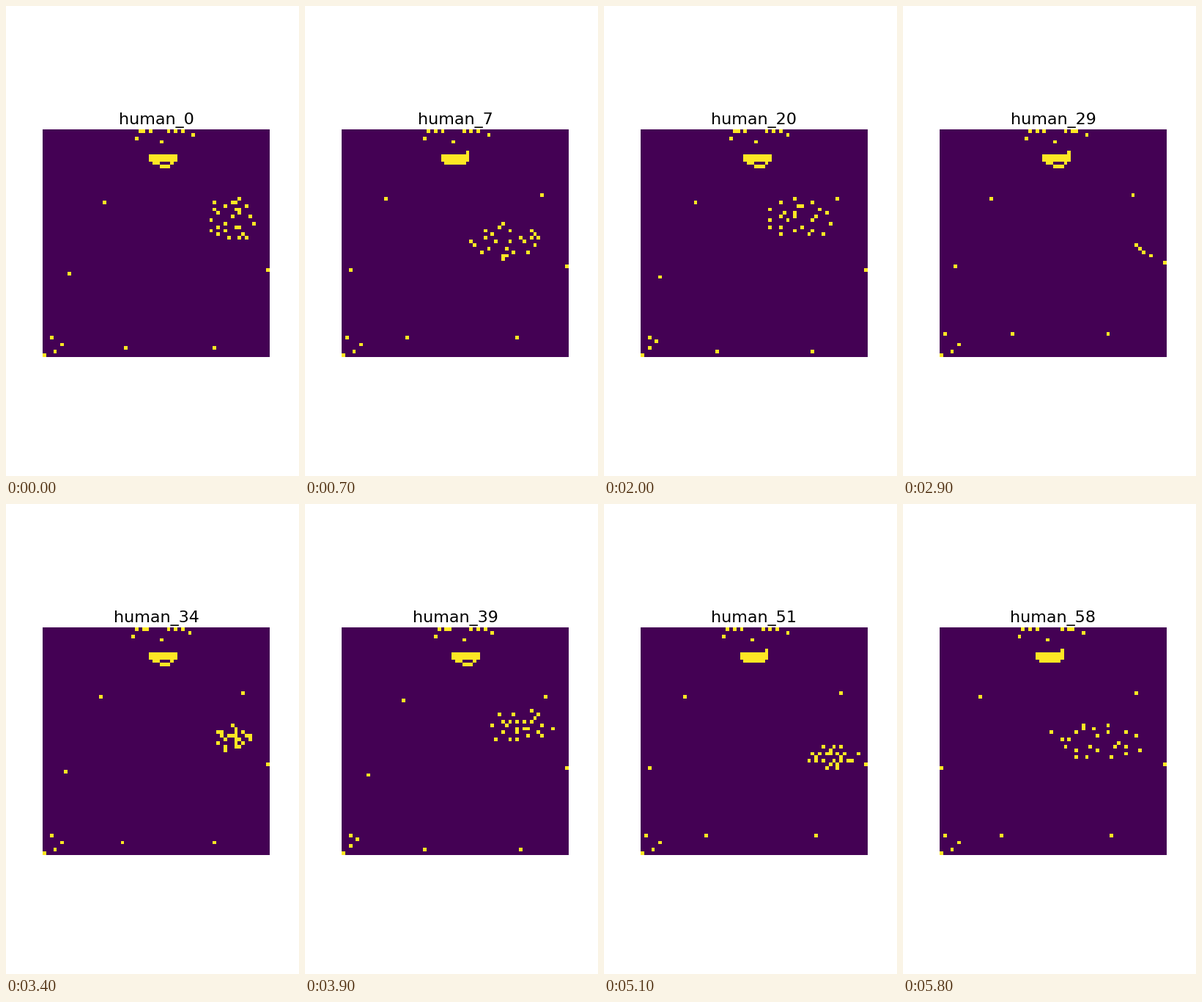
A matplotlib script for the animation above (5.9 s loop, 400 px wide and 640 px high).

```python
import numpy as np
import matplotlib.pyplot as plt
from matplotlib.animation import FuncAnimation

GRID, FRAMES, STEP_MS = 64, 59, 100
KEYS = [0, 7, 20, 29, 39, 45, 58]
JOINTS = 25


def motion(*values):
    return np.interp(np.arange(FRAMES), KEYS, values)


# Body sway, in grid cells
lean = motion(0, -5, -2, -3, 0.4, -4, -6)
dip = motion(0, -3, 1, -4, 1, -3, -3)
turn = motion(0, 1, 0, -1, 2, 1, 0)

# Centre and reach of the signing hands
hand_x = motion(52.5, 46, 44, 56.8, 50, 61.5, 43.5)
hand_y = motion(25, 31, 24.5, 33.8, 27.5, 40, 31.5)
reach_x = motion(7, 11, 9.5, 1.5, 9, 1.5, 13.5)
reach_y = motion(6.5, 5, 6, 2, 4.5, 2, 5.5)

# Evenly spread joints, slightly scattered
index = np.arange(JOINTS)
radius = np.sqrt((index + 0.5) / JOINTS)
angle = index * np.pi * (3 - np.sqrt(5))
scatter = np.random.default_rng(4).normal(0, 0.08, (2, JOINTS))


def body(n):
    a, d, t = lean[n], dip[n], turn[n]
    pts = [
        (33.4 + 0.5 * a, 3),                            # nose
        (25.9 + 0.65 * a, 2), (41.7 + 0.2 * a, 1),      # ears
        (17 + a, 19.9 + 0.3 * d),                       # shoulders
        (55 + t, 18.8 + 0.3 * d),
        (7 + 1.1 * a, 40.3 + 0.5 * d),                  # elbows
        (63, 38.9 + 0.4 * d),
        (23 + a, 61 + d), (48 + t, 61 + d),             # hips
        (1.9 + 0.2 * a, 58.2 + 0.2 * d),                # resting hand
        (4.6 - 0.2 * d, 59.6 - 0.2 * d),
        (2.6 - 0.2 * d, 61.6 - 0.2 * d),
        (0, 63),
    ]
    for i in range(3):  # eyes, the far one moving less
        pts.append((26.9 + 1.6 * i + (0.65 - 0.07 * i) * a, 0))
        pts.append((35.4 + 2 * i + (0.25 + 0.04 * i) * a, 0))
    return pts


def hands(n):
    if reach_x[n] < 3:  # lowered: only the knuckles remain
        i = np.arange(4) - 1.5
        x, y = 1.2 * i, i
    else:
        twist = angle + 0.1 * n
        x = reach_x[n] * (radius * np.cos(twist) + scatter[0])
        y = reach_y[n] * (radius * np.sin(twist) + scatter[1])
    return np.column_stack([hand_x[n] + x, hand_y[n] + y])


def draw_mouth(grid, n):
    left = int(np.rint(33.4 + 0.5 * lean[n])) - 3
    grid[7:9, left:left + 8] = 1
    if lean[n] > -3.5:  # open
        grid[9, [left + 1, left + 2, left + 6]] = 1
        grid[10, left + 3:left + 6] = 1
    else:
        grid[9, left + 1:left + 7] = 1
    if dip[n] < -2:  # raised corner
        grid[6, left + 7] = 1


def grid_at(n):
    grid = np.zeros((GRID, GRID))
    pts = np.vstack([body(n), hands(n)])
    cols, rows = np.clip(np.rint(pts), 0, GRID - 1).astype(int).T
    grid[rows, cols] = 1
    draw_mouth(grid, n)
    return grid


fig, ax = plt.subplots(figsize=(4, 6.4), dpi=100)
fig.subplots_adjust(left=0.125, right=0.9, bottom=0.11, top=0.88)
ax.axis("off")
image = ax.imshow(grid_at(0), cmap="viridis", vmin=0, vmax=1)
title = ax.set_title("human_0", fontsize=16, fontfamily="DejaVu Sans", pad=5)


def update(n):
    image.set_data(grid_at(n))
    title.set_text(f"human_{n}")
    return image, title


anim = FuncAnimation(fig, update, frames=FRAMES, interval=STEP_MS, repeat=True)
plt.show()
```
